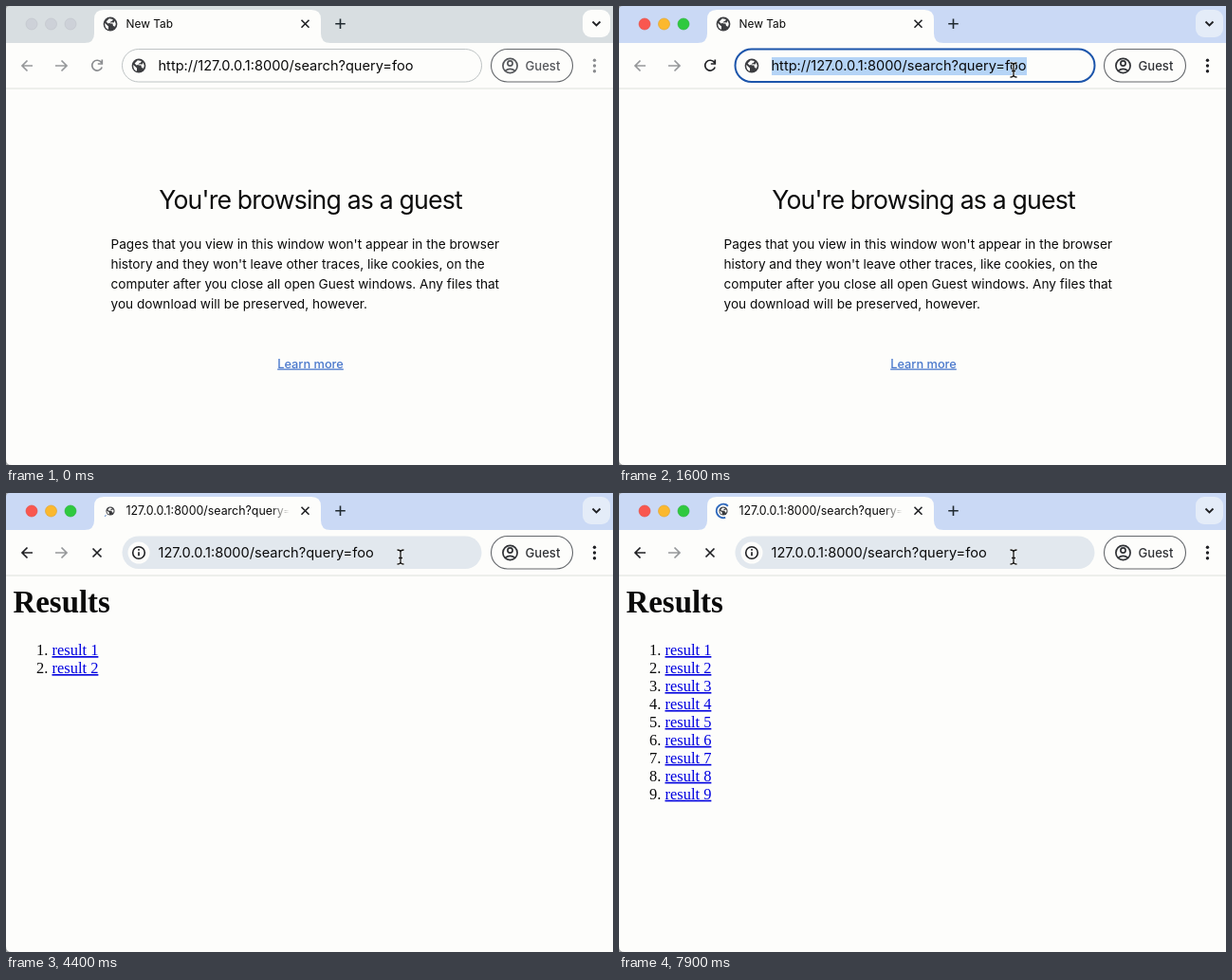
Recreate the animation shown at these times as an HTML page. Size 640 px wide and 484 px high, loop 8 s.

```html
<!DOCTYPE html>
<html lang="en">
<head>
<meta charset="utf-8">
<title>Streaming search results</title>
<style>
html, body { margin: 0; width: 100%; height: 100%; overflow: hidden; }
svg { display: block; width: 640px; height: 484px; font-family: Inter, "Open Sans", sans-serif; font-optical-sizing: none; }
text { fill: #0a0a0a; white-space: pre; }
.line { fill: none; stroke: var(--ink); stroke-width: 1.7; }
.off { stroke: #96989a; }
.serif { font: 16.45px "Liberation Serif", Times, serif; }
.link { fill: #0000e0; text-decoration: underline; }

svg { --ink: #202124; --strip: #cad9f5; --button: #e4ecf8; --label: #303236; --paper: #fdfdfb; }
svg.idle { --ink: #8a8c8f; --strip: #d8dee1; --button: #fdfdfb; --label: #55575b; }
.idle .light { fill: #cdd1d8; stroke: #bfc3ca; }
.pill { fill: var(--paper); stroke: #bec3c4; }
.focus .pill { stroke: #1c55ab; stroke-width: 2; }
.loading .pill { fill: #e2e8ee; stroke: none; }
.on-idle, .on-focus, .on-loading { display: none; }
.idle .on-idle, .focus .on-focus, .loading .on-loading { display: inline; }
.loading .before { display: none; }
</style>
</head>
<body>
<svg id="stage" viewBox="0 0 640 484" class="idle">
  <defs>
    <linearGradient id="fade">
      <stop offset="0" stop-color="#fdfdfb" stop-opacity="0"/>
      <stop offset=".7" stop-color="#fdfdfb"/>
    </linearGradient>
    <g id="globe">
      <circle r="7.4" fill="#3c3d40"/>
      <path d="M-5.8 -1 L-2 2.6 V5.8 C-4.5 5 -6 2.5 -5.8 -1Z M-1.2 -5.8 L2.8 -5 Q2.6 -2.6 .2 -2.4 L-.4 -.6 H2.4 L3 2 L5 2.8 Q6.6 -.5 4.6 -3.6 L3.8 -1.6 L1 -1.8 L-2.4 -.4 L-4.4 -2.6 Z" fill="#fdfdfb"/>
    </g>
    <path id="beam" d="M412.500 60 q3.500 0 3.500 2.500 q0 -2.500 3.500 -2.500 M416 62 V73 M412.500 75 q3.500 0 3.500 -2.500 q0 2.500 3.500 2.500 M414 68.500 h4"/>
  </defs>

  <rect width="640" height="484" fill="var(--paper)"/>
  <rect width="640" height="39" fill="var(--strip)"/>
  <path d="M83 39 q10 0 10 -10 V14 q0 -10 10 -10 H322 q10 0 10 10 V29 q0 10 10 10Z" fill="var(--paper)"/>
  <circle class="light" cx="27" cy="19" r="6" fill="#f9574f" stroke="#e2493f" stroke-width=".6"/>
  <circle class="light" cx="47.5" cy="19" r="6" fill="#fbb82e" stroke="#e0a126" stroke-width=".6"/>
  <circle class="light" cx="68" cy="19" r="6" fill="#2fc93f" stroke="#27b034" stroke-width=".6"/>

  <!-- tab -->
  <g class="before">
    <use href="#globe" x="110" y="19"/>
    <text x="126.500" y="23" font-size="11.9">New Tab</text>
  </g>
  <g class="on-loading">
    <use href="#globe" transform="translate(110 19) scale(.62)"/>
    <path id="arc" fill="none" stroke="#2f69bd" stroke-width="2"/>
    <text x="126.500" y="23" font-size="12.4">127.0.0.1:8000/search?query=</text>
    <rect x="279" y="8" width="28" height="22" fill="url(#fade)"/>
  </g>
  <path d="M311.500 14.700 l8 8 m0 -8 l-8 8" fill="none" stroke="#202124" stroke-width="1.6"/>
  <path d="M352.500 13.500 v10.500 m-5.250 -5.250 h10.500" fill="none" stroke="#202a30" stroke-width="1.6"/>
  <rect x="608" y="4" width="29" height="29" rx="9" fill="var(--button)"/>
  <path d="M618.500 16.500 l4 4 l4 -4" fill="none" stroke="#202124" stroke-width="1.8"/>

  <!-- toolbar -->
  <path d="M0 87 H640" stroke="#e9ebe6" stroke-width="1.5"/>
  <path class="line before off" d="M28 63 H17 m5.500 -5.500 l-5.500 5.500 l5.500 5.500"/>
  <path class="line on-loading" d="M28 63 H17 m5.500 -5.500 l-5.500 5.500 l5.500 5.500"/>
  <path class="line off" d="M52 63 H64 m-5.500 -5.500 l5.500 5.500 l-5.500 5.500"/>
  <path class="line before" d="M100.500 59.500 A5.400 5.400 0 1 0 101.200 64.500 M101.300 56.500 V61 H96.800"/>
  <path class="line on-loading" d="M91.500 58.500 l9 9 m0 -9 l-9 9"/>
  <rect class="pill" x="122.500" y="45.500" width="379" height="34.500" rx="17.250"/>
  <rect class="on-focus" x="161" y="54" width="269" height="19" fill="#b5d4f6"/>
  <g class="before">
    <use href="#globe" x="140" y="63"/>
    <text x="160.500" y="68" font-size="14.59">http://127.0.0.1:8000/search?query=foo</text>
  </g>
  <g class="on-loading">
    <circle cx="140" cy="63" r="11.5" fill="#fdfdfb"/>
    <circle cx="140" cy="63" r="6.3" fill="none" stroke="#202124" stroke-width="1.6"/>
    <path d="M140 62.300 v4 m0 -7.400 v1.800" stroke="#202124" stroke-width="1.7"/>
    <text x="160.500" y="68" font-size="14.59">127.0.0.1:8000/search?query=foo</text>
  </g>
  <rect x="511.500" y="45.500" width="86" height="34.500" rx="17.250" fill="none" stroke="#66696d" stroke-width="1.1"/>
  <g fill="none" stroke="var(--label)" stroke-width="1.7">
    <circle cx="531.5" cy="63" r="7.6"/>
    <circle cx="531.5" cy="60.5" r="2.6"/>
    <path d="M526.300 68.300 q5.200 -4 10.400 0"/>
  </g>
  <text x="547.500" y="68" font-size="13.1" font-weight="500" style="fill:var(--label)">Guest</text>
  <g fill="var(--ink)">
    <circle cx="620.5" cy="57.3" r="1.7"/>
    <circle cx="620.5" cy="63" r="1.7"/>
    <circle cx="620.5" cy="68.7" r="1.7"/>
  </g>

  <!-- guest page -->
  <g class="before">
    <text x="321" y="214" font-size="26.6" letter-spacing="-.8" text-anchor="middle">You're browsing as a guest</text>
    <g font-size="13.63">
      <text x="110.500" y="256">Pages that you view in this window won't appear in the browser</text>
      <text x="110.500" y="277">history and they won't leave other traces, like cookies, on the</text>
      <text x="110.500" y="298">computer after you close all open Guest windows. Any files that</text>
      <text x="110.500" y="319">you download will be preserved, however.</text>
    </g>
    <text x="321" y="381.500" font-size="12.8" font-weight="500" text-anchor="middle" text-decoration="underline" style="fill:#4a78cc">Learn more</text>
  </g>

  <!-- results page -->
  <g class="on-loading serif">
    <text x="7.500" y="126" font-size="32.9" font-weight="bold">Results</text>
    <g id="list"></g>
  </g>

  <path d="M0 478 q0 6 6 6 H0Z M0 4 q0 -4 4 -4 H0Z" fill="#a3a5a6"/>
  <path id="arrow" class="on-idle" d="M0 0 V14 L3.200 11.200 L5.500 16.500 L8 15.400 L5.700 10.300 H10Z" fill="#111" stroke="#fdfdfb"/>
  <g class="on-focus on-loading" fill="none">
    <use href="#beam" stroke="#fdfdfb" stroke-width="2.6"/>
    <use href="#beam" stroke="#111" stroke-width="1.3"/>
  </g>
</svg>
<script>
const LOOP = 8000, CLICK = 1400, LOAD = 3080, FIRST_ROW = 3580, ROW_EVERY = 500;
const $ = id => document.getElementById(id);
const clamp = v => Math.min(1, Math.max(0, v));
const smooth = p => p * p * (3 - 2 * p);

$('list').innerHTML = Array.from({ length: 9 }, (_, i) => {
  const y = 171 + i * 18.97;
  return `<g><text x="32" y="${y}">${i + 1}.</text><text class="link" x="48.500" y="${y}">result ${i + 1}</text></g>`;
}).join('');
const rows = [...$('list').children];

// The arc shrinks, then grows, while the whole ring keeps turning.
function spinner(t) {
  const time = t - 2436, step = 666, max = 270;
  const phase = Math.floor(time / step);
  let sweep = max * smooth(time / step - phase);
  if (phase % 2 === 0) sweep -= max;
  if (Math.abs(sweep) < 5) sweep = sweep < 0 ? -5 : 5;
  const start = 138 + time / 1568 * 360 + Math.floor(phase / 2) * max;
  const point = deg => {
    const a = deg * Math.PI / 180;
    return `${110 + 7.2 * Math.cos(a)} ${19 + 7.2 * Math.sin(a)}`;
  };
  const large = Math.abs(sweep) > 180 ? 1 : 0;
  return `M${point(start)} A7.2 7.2 0 ${large} ${sweep > 0 ? 1 : 0} ${point(start + sweep)}`;
}

function draw(t) {
  $('stage').setAttribute('class', t < CLICK ? 'idle' : t < LOAD ? 'focus' : 'loading');
  const move = 1 - (1 - clamp((t - 300) / 700)) ** 2;
  $('arrow').setAttribute('transform', `translate(${650 - 232 * move} ${490 - 422 * move})`);
  $('arc').setAttribute('d', spinner(t));
  const count = Math.floor((t - FIRST_ROW) / ROW_EVERY) + 1;
  rows.forEach((row, i) => row.setAttribute('visibility', i < count ? 'visible' : 'hidden'));
}

const begin = performance.now();
function tick() {
  draw((performance.now() - begin) % LOOP);
  requestAnimationFrame(tick);
}
tick();
</script>
</body>
</html>
```
